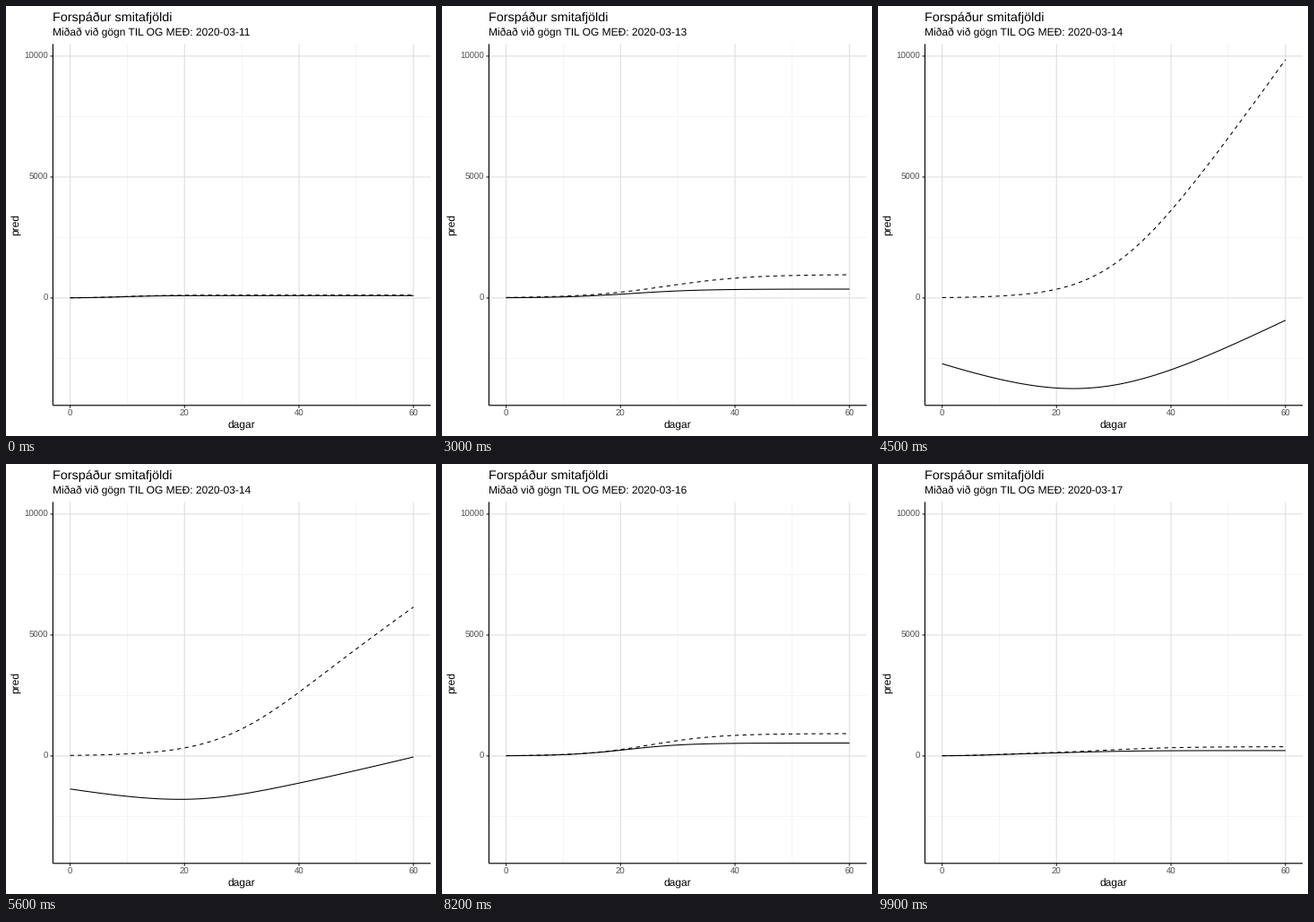
These frames come from a looping animation (480x480 px, 10 s). A matplotlib script:

```python
import numpy as np
import matplotlib.pyplot as plt
from matplotlib.animation import FuncAnimation

SIZE, FRAMES = 480, 100
LEFT, RIGHT, TOP, BOTTOM = 52.4, 474, 42.4, 445.8
AXIS_LW, LINE_LW = 1.16, 1.07
LOW, HIGH = -3763, 9822
PAD = (HIGH - LOW) * .05

plt.rcParams["font.family"] = "Liberation Sans"
plt.rcParams["text.hinting"] = "none"
days = np.arange(61)


def logistic(cap, mid, rate, floor=0):
    return floor + (cap - floor) / (1 + np.exp(-rate * (days - mid)))


def bend(start, slope, gain, mid, width):
    """Straight line whose slope grows by gain around day mid."""
    return start + slope * days + gain * width * np.logaddexp(0, (days - mid) / width)


# (solid, dashed) forecast for each date from 11 to 17 March
states = [
    (logistic(95, 9, .30), logistic(118, 10, .28)),
    (logistic(198, 15, .22), logistic(390, 20, .17)),
    (logistic(366, 21.9, .165), logistic(970, 28, .14)),
    (bend(-2800, -80, 196, 26.1, 8.6), bend(0, 0, 330, 30.2, 6.2)),
    (logistic(840, 28.9, .168, -18), logistic(2560, 35.4, .13)),
    (logistic(495, 20.6, .20), logistic(822, 24.4, .18)),
    (logistic(730, 23.3, .18), logistic(1435, 28.6, .155)),
]

fig = plt.figure(figsize=(SIZE / 72, SIZE / 72), dpi=72, facecolor="white")
ax = fig.add_axes([LEFT / SIZE, 1 - BOTTOM / SIZE,
                   (RIGHT - LEFT) / SIZE, (BOTTOM - TOP) / SIZE])
ax.axis("off")
ax.set_xlim(-3, 63)
ax.set_ylim(LOW - PAD, HIGH + PAD)


def px_x(day):
    return LEFT + (day + 3) / 66 * (RIGHT - LEFT)


def px_y(value):
    return BOTTOM - (value - LOW + PAD) / (HIGH - LOW + 2 * PAD) * (BOTTOM - TOP)


def label(x, y, text, size, color="black", **kw):
    return fig.text(x / SIZE, 1 - y / SIZE, text, fontsize=size, color=color,
                    **{"va": "baseline", **kw})


def rule(x0, y0, x1, y1, color, width, order):
    ax.add_line(plt.Line2D([x0 / SIZE, x1 / SIZE], [1 - y0 / SIZE, 1 - y1 / SIZE],
                           transform=fig.transFigure, color=color, lw=width,
                           solid_capstyle="butt", snap=False, zorder=order,
                           clip_on=False))


def grid(xs, ys, color, width):
    for x in xs:
        rule(px_x(x), TOP, px_x(x), BOTTOM, color, width, 1)
    for y in ys:
        rule(LEFT, px_y(y), RIGHT, px_y(y), color, width, 1)


x_ticks, y_ticks = range(0, 61, 20), range(0, 10001, 5000)
grid(range(10, 60, 20), range(-2500, 10000, 5000), "#ebebeb", .45)
grid(x_ticks, y_ticks, "#e0e0e0", AXIS_LW)

rule(LEFT, TOP, LEFT, BOTTOM, "black", AXIS_LW, 5)
rule(LEFT, BOTTOM, RIGHT, BOTTOM, "black", AXIS_LW, 5)
for x in x_ticks:
    rule(px_x(x), BOTTOM, px_x(x), BOTTOM + 3, "#333333", AXIS_LW, 4)
    label(px_x(x), 458.3, str(x), 9.6, "#4d4d4d", ha="center")
for y in y_ticks:
    rule(LEFT - 3, px_y(y), LEFT, px_y(y), "#333333", AXIS_LW, 4)
    label(LEFT - 5.4, px_y(y) + 3.4, str(y), 9.6, "#4d4d4d", ha="right")

label(LEFT, 17, "Forspáður smitafjöldi", 14.4)
subtitle = label(LEFT, 34, "", 12)
label((LEFT + RIGHT) / 2, 472, "dagar", 12, ha="center")
label(17.6, (TOP + BOTTOM) / 2, "pred", 12, rotation=90, ha="right", va="center")

solid, = ax.plot([], [], "k-", lw=LINE_LW, solid_capstyle="butt", zorder=3)
dashed, = ax.plot([], [], color="black", lw=LINE_LW, ls=(0, (4, 4)), zorder=3)


def locate(frame):
    """Current state and how far it has moved towards the next."""
    for i in range(len(states)):
        start = 10 + 14 * i + min(i, 2)
        arrival = min(start + 5, FRAMES)
        if frame < arrival:
            return i, max(0, frame - start + 1) / (arrival - start + 1)


def draw(frame):
    i, p = locate(frame)
    following = states[(i + 1) % len(states)]
    for line, a, b in zip((solid, dashed), states[i], following):
        line.set_data(days, a + (b - a) * p)
    subtitle.set_text(f"Miðað við gögn TIL OG MEÐ: 2020-03-{11 + i}")
    return solid, dashed, subtitle


anim = FuncAnimation(fig, draw, frames=FRAMES, interval=100, repeat=True,
                     repeat_delay=0)
plt.show()
```
